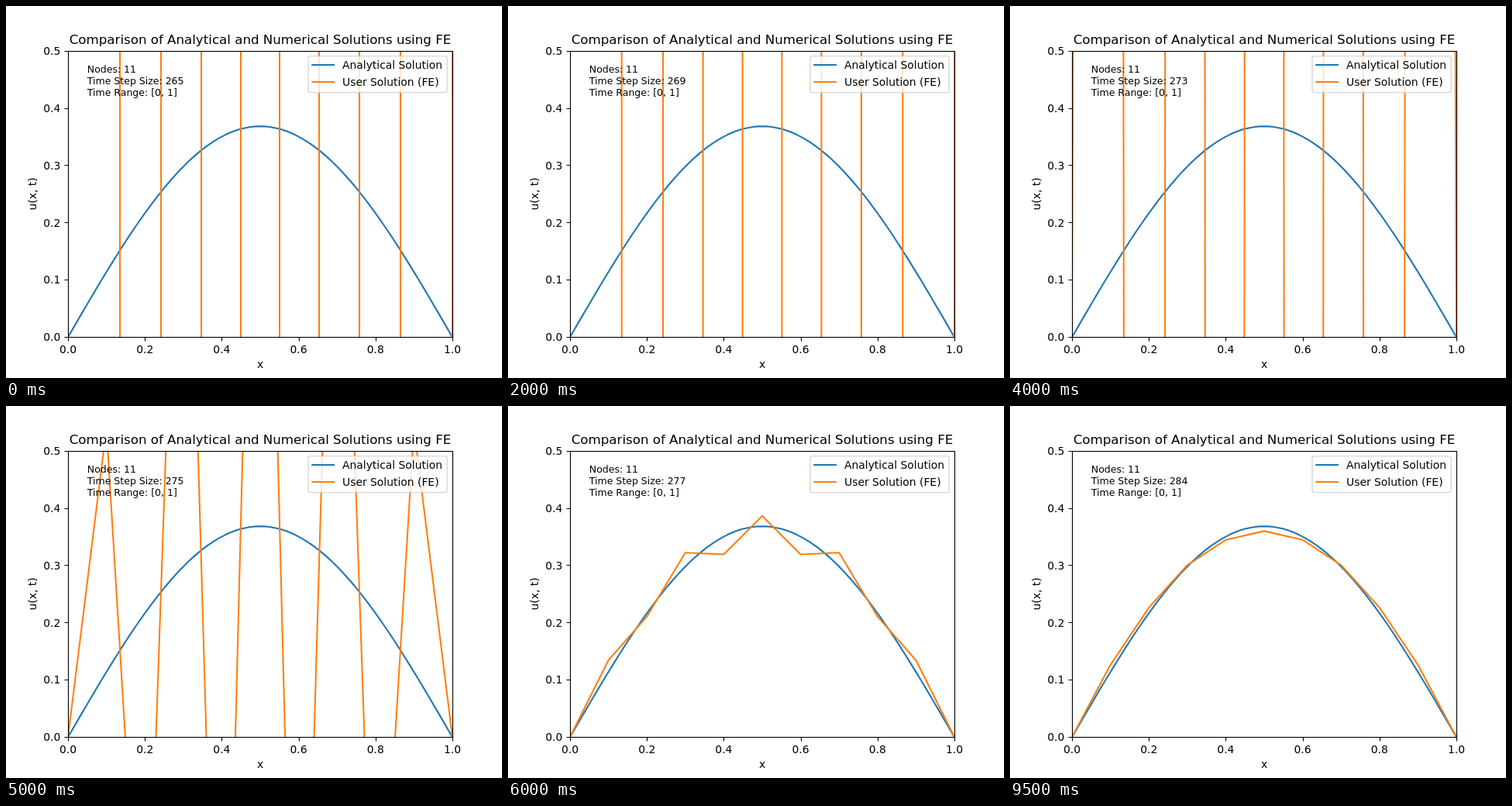
These frames come from a looping animation (640x480 px, 10 s). An HTML page:

```html
<!DOCTYPE html>
<html lang="en">
<head>
<meta charset="utf-8">
<title>Analytical and numerical solutions</title>
<style>
  html, body { margin: 0; width: 100%; height: 100%; overflow: hidden; background: #fff; }
  svg { display: block; width: 640px; height: 480px; }
  text { font: 13.89px "DejaVu Sans", sans-serif; fill: #000; white-space: pre; }
  .title { font-size: 16.67px; }
  .note { font-size: 12.5px; }
  .mid { text-anchor: middle; }
  .end { text-anchor: end; }
  .line { fill: none; stroke-width: 2.08; stroke-linecap: square; stroke-linejoin: round; }
  .blue { stroke: #1f77b4; }
  .orange { stroke: #ff7f0e; }
  .axis { fill: none; stroke: #000; stroke-width: 1.11; }
</style>
</head>
<body>
<svg viewBox="0 0 640 480">
  <clipPath id="plot"><rect x="80" y="58" width="496" height="369"/></clipPath>
  <rect width="640" height="480" fill="#fff"/>
  <g clip-path="url(#plot)">
    <path id="exact" class="line blue"/>
    <path id="approx" class="line orange"/>
  </g>
  <rect class="axis" x="80.5" y="58.5" width="496" height="369"/>
  <path id="ticks" class="axis"/>
  <g id="labels"></g>
  <text class="title mid" x="328" y="49">Comparison of Analytical and Numerical Solutions using FE</text>
  <text class="mid" x="328" y="467">x</text>
  <text class="mid" transform="translate(39 242.4) rotate(-90)">u(x, t)</text>
  <text class="note" x="104.8" y="86">Nodes: 11</text>
  <text class="note" x="104.8" y="101" id="steps"></text>
  <text class="note" x="104.8" y="116">Time Range: [0, 1]</text>
  <rect x="390" y="64.6" width="179.2" height="47" rx="2.8" fill="#fff" stroke="#ccc" stroke-width="1.39" opacity="0.8"/>
  <path class="line blue" d="M395.3 76H423"/>
  <path class="line orange" d="M395.3 98H423"/>
  <text x="434" y="81">Analytical Solution</text>
  <text x="434" y="103">User Solution (FE)</text>
</svg>
<script>
const LOOP = 10000, STEP = 500, FIRST = 265;
const TOP = 40, BOTTOM = 445;
const $ = id => document.getElementById(id);
const px = x => 80 + 496 * x;
const py = u => 427.2 - 739.2 * u;

// Odd sine modes of the settled finite element solution.
const MODES = [[1, 0.3688], [3, 0.011], [5, 0.0022], [7, 0.0009], [9, 0.0005]];

// Mode 9 grows without bound when the time step is too large.
const c9 = Math.cos(0.9 * Math.PI);
const STIFF = 300 * (1 - c9) / (2 + c9);

function nodes(n) {
  const growth = Math.pow(1 - STIFF / n, n);
  return Array.from({ length: 11 }, (_, j) => {
    const u = j % 10 === 0 ? 0 : MODES.reduce((sum, [k, a]) =>
      sum + a * (k === 9 ? 1 - growth : 1) * Math.sin(k * Math.PI * j / 10), 0);
    return [px(j / 10), py(u)];
  });
}

// Cut a segment to the visible band of heights.
function clip([x0, y0], [x1, y1]) {
  if (Math.max(y0, y1) < TOP || Math.min(y0, y1) > BOTTOM) return null;
  const cut = y => {
    const c = Math.min(BOTTOM, Math.max(TOP, y));
    return c === y ? 0 : (c - y0) / (y1 - y0);
  };
  const at = (x, y) => {
    const s = cut(y);
    return s ? [x0 + s * (x1 - x0), y0 + s * (y1 - y0)] : [x, y];
  };
  return [at(x0, y0), at(x1, y1)];
}

function curve(points) {
  const segs = points.slice(1).map((p, i) => clip(points[i], p)).filter(Boolean);
  const upright = segs.every(([a, b]) => Math.abs(a[0] - b[0]) < 1e-4);
  const fmt = ([x, y]) => (upright ? Math.round(x) : x.toFixed(3)) + " " + y.toFixed(3);
  let d = "", last = "";
  for (const [a, b] of segs) {
    const start = fmt(a), end = fmt(b);
    d += (start === last ? "" : "M" + start) + "L" + end;
    last = end;
  }
  return d;
}

function buildAxes() {
  const snap = v => Math.floor(v + 0.5) + 0.5;
  let d = "", labels = "";
  for (let i = 0; i <= 5; i++) {
    const x = px(i / 5), y = py(i / 10);
    d += `M${snap(x)} 427.5V432.5M80.5 ${snap(y)}H75.5`;
    labels += `<text class="mid" x="${x}" y="448">${(i / 5).toFixed(1)}</text>`;
    labels += `<text class="end" x="70.3" y="${Math.round(y + 5.2)}">${(i / 10).toFixed(1)}</text>`;
  }
  $("ticks").setAttribute("d", d);
  $("labels").innerHTML = labels;
  const exact = Array.from({ length: 101 }, (_, i) =>
    [px(i / 100), py(Math.exp(-1) * Math.sin(Math.PI * i / 100))]);
  $("exact").setAttribute("d", curve(exact));
}

let shown = 0;
function draw(ms) {
  const n = FIRST + Math.floor((ms % LOOP) / STEP);
  if (n === shown) return;
  shown = n;
  $("approx").setAttribute("d", curve(nodes(n)));
  $("steps").textContent = "Time Step Size: " + n;
}

buildAxes();
draw(0);
const begin = performance.now();
function tick() {
  draw(performance.now() - begin);
  requestAnimationFrame(tick);
}
requestAnimationFrame(tick);
</script>
</body>
</html>
```
